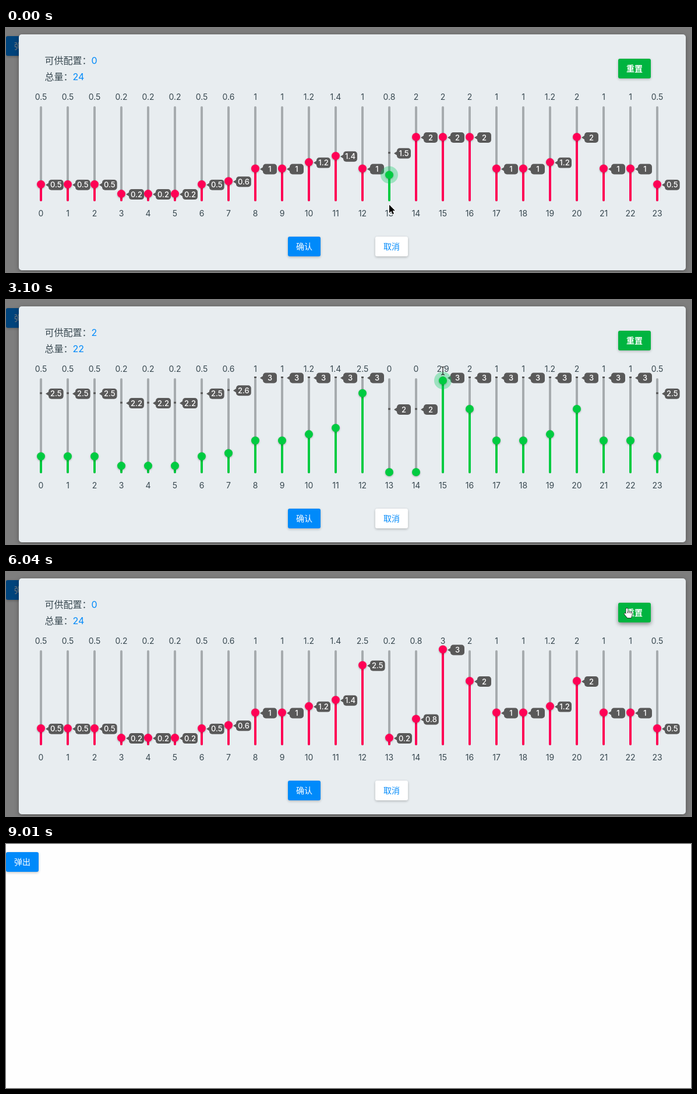
Recreate the animation shown at these times as an HTML page with a canvas. Size 1176 by 421 pixels, loop 9.34 s.

```html
<!DOCTYPE html>
<html lang="zh-CN">
<head>
<meta charset="utf-8">
<style>
html, body { margin: 0; width: 100%; height: 100%; overflow: hidden; background: #fefefe; }
canvas { display: block; }
</style>
</head>
<body>
<canvas width="1176" height="421"></canvas>
<script>
const ctx = document.querySelector('canvas').getContext('2d');
const LOOP = 9340, STEP = 147.7, CLOSE = 58, RESET = 44, LIMIT = 3;
const FONT = 'Inter, "Noto Sans CJK SC", "Noto Sans CJK", sans-serif';
const BLUE = '#008afa', GREEN = '#00cb41', PINK = '#ff0055', TEXT = '#37474f', DARK = '#595959';

const initial = [.5, .5, .5, .2, .2, .2, .5, .6, 1, 1, 1.2, 1.4, 1, 1.5, 2, 2, 2, 1, 1, 1.2, 2, 1, 1, .5];
const total = 24;

// slider, press, arrival and release (in steps), first and last value
const drags = [
  [13, 0, 1, 3, .8, 0],
  [12, 7, 9, 10, 1, 2.5],
  [14, 14, 17, 18, 2, 0],
  [15, 19, 22, 22, 2, 3],
  [14, 28, 29, 30, 0, .8],
  [13, 33, 35, 36, 0, .2]
];

// step, x, y, pointer shape
const path = [
  [0, 658, 305, 'arrow'], [2, 658, 314, 'arrow'], [3, 656, 310, 'arrow'], [6, 611, 223, 'arrow'],
  [7, 612, 238, 'hand'], [10, 612, 157, 'hand'], [11, 612, 157, 'hand'], [14, 704, 184, 'hand'],
  [17, 704, 300, 'arrow'], [18, 704, 336, 'arrow'], [19, 750, 186, 'hand'], [21, 750, 122, 'beam'],
  [22, 750, 128, 'hand'], [24, 720, 230, 'arrow'], [26, 704, 293, 'hand'], [28, 704, 293, 'hand'],
  [30, 704, 259, 'hand'], [31, 690, 270, 'arrow'], [33, 658, 294, 'hand'], [36, 659, 280, 'arrow'],
  [40, 1060, 64, 'hand'], [41, 1066, 62, 'hand'], [44, 1066, 62, 'hand'], [45, 1000, 110, 'arrow'],
  [48, 520, 368, 'hand'], [49, 512, 372, 'hand'], [51, 512, 372, 'hand'], [55, 532, 376, 'hand'],
  [56, 645, 350, 'arrow'], [57, 652, 376, 'hand'], [58, 651, 384, 'arrow'], [59, 800, 394, 'arrow'],
  [60, 1018, 405, 'arrow'], [61, 1100, 440, 'arrow']
];

const arrow = new Path2D('M0 0V14L3.3 11L5.6 16.3L8 15.2L5.8 10.2H10Z');
const hand = new Path2D('M-1.5 7.5V1.5Q0 -.5 1.5 1.5V6Q3 5 4.2 6.3Q5.6 5.6 6.8 7Q8.7 6.6 8.7 8.6V12L7.2 17H.8L-4.2 11Q-5 8.6 -2.8 9.2L-1.5 10.4Z');
const beam = new Path2D('M-3 -7Q0 -7 0 -5Q0 -7 3 -7M0 -5V5M-3 7Q0 7 0 5Q0 7 3 7');

const round = v => Math.round(v * 10) / 10;
const yOf = v => 297 - 54.5 * v;

function pointerAt(step) {
  const last = path.length - 1;
  let k = 0;
  while (k < last && path[k + 1][0] <= step) k++;
  const a = path[k], b = path[Math.min(k + 1, last)];
  const p = b === a ? 0 : Math.max(0, step - a[0]) / (b[0] - a[0]);
  return { x: a[1] + (b[1] - a[1]) * p, y: a[2] + (b[2] - a[2]) * p, shape: a[3] };
}

function stateAt(step) {
  const values = [...initial];
  let active = -1, live = 0;
  if (step < RESET) for (const [i, press, arrive, release, from, to] of drags) {
    if (step >= release) values[i] = to;
    else if (step >= press) {
      const p = Math.min(1, (step - press) / (arrive - press));
      active = i;
      live = round(from + (to - from) * Math.sin(p * Math.PI / 2));
    }
  }
  return { values, active, live, used: round(values.reduce((a, b) => a + b)) };
}

function text(str, x, y, size, color, weight = 400, align = 'center') {
  ctx.font = `${weight} ${size}px ${FONT}`;
  ctx.textAlign = align;
  ctx.fillStyle = color;
  ctx.fillText(str, x, y);
}

function box(x, y, w, h, r, color) {
  ctx.fillStyle = color;
  ctx.beginPath();
  ctx.roundRect(x, y, w, h, r);
  ctx.fill();
}

function disc(x, y, r, color) {
  ctx.fillStyle = color;
  ctx.beginPath();
  ctx.arc(x, y, r, 0, 7);
  ctx.fill();
}

function shadowed(blur, dy, alpha, draw) {
  ctx.save();
  ctx.shadowColor = `rgba(0,0,0,${alpha})`;
  ctx.shadowBlur = blur;
  ctx.shadowOffsetY = dy;
  draw();
  ctx.restore();
}

function button(label, x, y, fill, color, pointer) {
  const over = pointer && pointer.x >= x && pointer.x <= x + 56 && pointer.y >= y && pointer.y <= y + 34;
  shadowed(over ? 7 : 4, over ? 3 : 1.5, over ? .42 : .24, () => box(x, y, 56, 34, 3, fill));
  text(label, x + 28, y + 22.3, 14, color, fill === GREEN || label === '重置' ? 700 : 500);
}

function badge(x, y, value) {
  ctx.font = `500 13px ${FONT}`;
  const w = Math.max(24, ctx.measureText(value).width + 6);
  box(x + 13, y - 9, w, 18, 5, DARK);
  ctx.beginPath();
  ctx.moveTo(x + 8, y);
  ctx.lineTo(x + 14, y - 4);
  ctx.lineTo(x + 14, y + 4);
  ctx.fill();
  text(value, x + 13 + w / 2, y + 4.6, 13, '#fff', 500);
}

function slider(i, value, max, active) {
  const x = 60 + 46 * i, y = yOf(value), yMax = yOf(max);
  const color = value < max ? GREEN : PINK;
  text(value, x, 124, 14, TEXT);
  text(i, x, 325, 14, TEXT);
  box(x - 2, 135, 4, 164, 2, '#a6abae');
  box(x - 2, yMax - 1.5, 4, 3, 0, DARK);
  box(x - 2, y, 4, 299 - y, [0, 0, 2, 2], color);
  badge(x, yMax + 1, max);
  if (active) disc(x, y, 15, 'rgba(0,203,90,.32)');
  shadowed(3, 1, .3, () => disc(x, y, 7, color));
}

function dialog(step) {
  const { values, active, live, used } = stateAt(step);
  const free = round(total - used);
  const hover = pointerAt(Math.max(0, step - 1));
  box(0, 0, 1176, 421, 0, 'rgba(0,0,0,.5)');
  shadowed(8, 2, .3, () => box(22, 11, 1145, 407, 5, '#e8edf0'));
  text('可供配置：', 66.5, 62, 16, TEXT, 400, 'left');
  text(free, 146.5, 62, 16, BLUE, 400, 'left');
  text('总量：', 66.5, 90, 16, TEXT, 400, 'left');
  text(used, 114.5, 90, 16, BLUE, 400, 'left');
  button('重置', 1051, 53, '#00b440', '#fff', hover);
  button('确认', 484, 360, BLUE, '#fff', hover);
  button('取消', 634, 360, '#fff', BLUE, hover);
  values.forEach((v, i) =>
    slider(i, i === active ? live : v, Math.min(LIMIT, round(v + free)), i === active));
}

function pointer({ x, y, shape }) {
  ctx.save();
  ctx.translate(x, y);
  ctx.lineJoin = 'round';
  if (shape === 'beam') {
    ctx.strokeStyle = '#222';
    ctx.lineWidth = 1.2;
    ctx.stroke(beam);
  } else {
    const isHand = shape === 'hand', outline = isHand ? hand : arrow;
    ctx.lineWidth = isHand ? 1.3 : 2;
    ctx.strokeStyle = isHand ? '#111' : '#fff';
    ctx.fillStyle = isHand ? '#fff' : '#000';
    ctx.stroke(outline);
    ctx.fill(outline);
    if (isHand) {
      ctx.lineWidth = 1;
      ctx.stroke(new Path2D('M1.5 6V9M4.2 6.5V9M6.8 7.2V9.5'));
    }
  }
  ctx.restore();
}

function frame(now) {
  const step = Math.floor((now % LOOP + 25) / STEP);
  box(0, 0, 1176, 421, 0, '#fefefe');
  button('弹出', 0, 14, BLUE, '#fff');
  if (step < CLOSE) dialog(step);
  if (step < 61) pointer(pointerAt(step));
  requestAnimationFrame(() => frame(performance.now() - start));
}

const start = performance.now();
frame(0);
</script>
</body>
</html>
```
